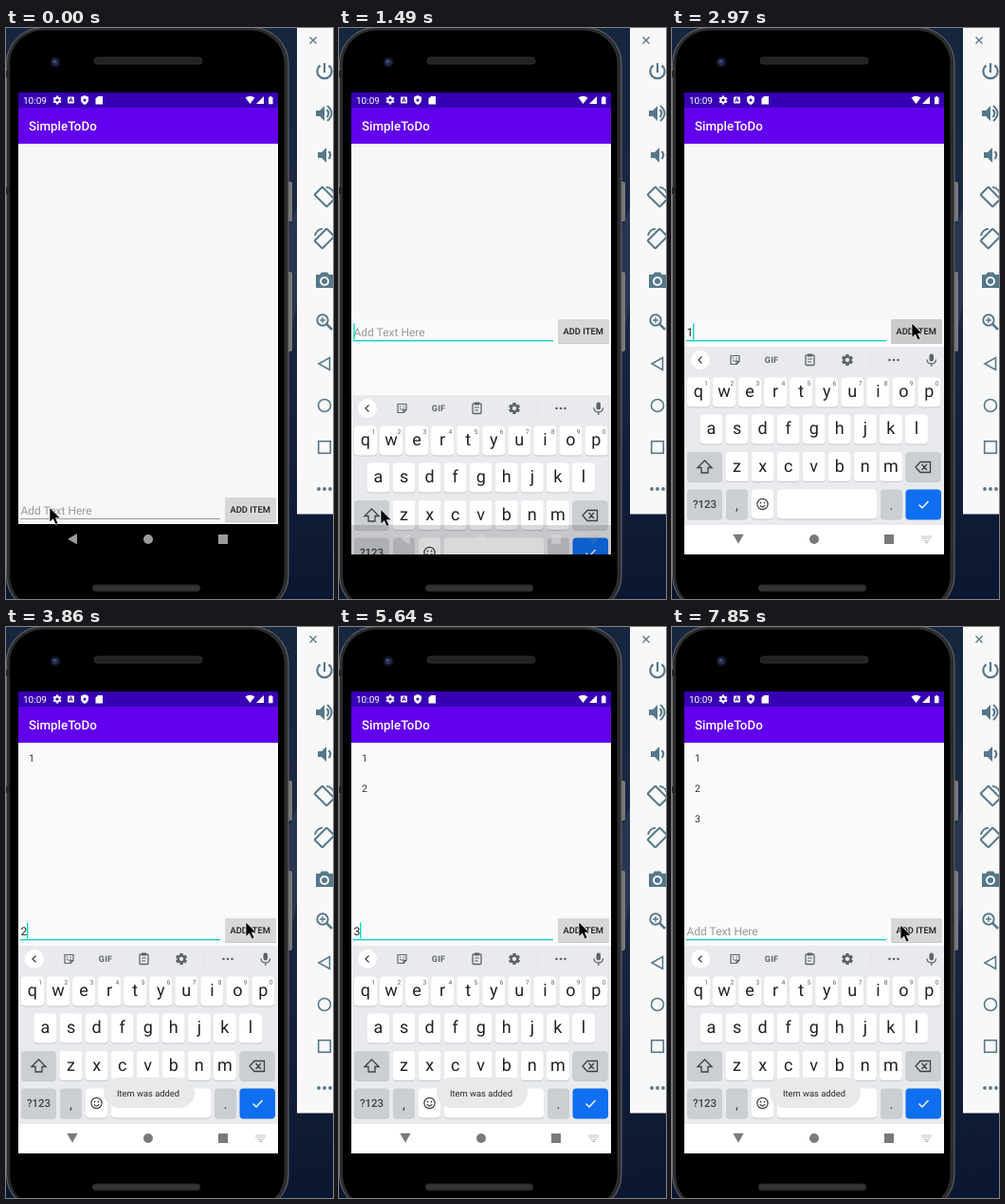
An HTML page that plays this animation: 345x602 px, repeating every 8000 ms.

```html
<!DOCTYPE html>
<html lang="en">
<head>
<meta charset="utf-8">
<title>To-do list demo</title>
<style>
html, body { margin: 0; width: 100%; height: 100%; overflow: hidden; background: #0d1930; }
svg { display: block; width: 100%; height: 100%; font-family: Roboto, sans-serif; text-rendering: geometricPrecision; }
.mid { text-anchor: middle; }
</style>
</head>
<body>
<svg id="stage" viewBox="0 0 345 602"></svg>
<script>
const LOOP = 8000, STEP = LOOP / 54;
const SLATE = '#56788a', DARK = '#3c4043', GREY = '#5f6368';

const rect = (x, y, w, h, fill, rx = 0, more = '') =>
  `<rect x="${x}" y="${y}" width="${w}" height="${h}" rx="${rx}" fill="${fill}" ${more}/>`;
const circle = (x, y, r, fill, more = '') =>
  `<circle cx="${x}" cy="${y}" r="${r}" fill="${fill}" ${more}/>`;
const path = (d, fill, more = '') => `<path d="${d}" fill="${fill}" ${more}/>`;
const line = (d, color, w = 1.5, more = '') =>
  path(d, 'none', `stroke="${color}" stroke-width="${w}" ${more}`);
const text = (x, y, size, fill, str, more = '') =>
  `<text x="${x}" y="${y}" font-size="${size}" fill="${fill}" ${more}>${str}</text>`;
const at = (x, y, body) => `<g transform="translate(${x} ${y})">${body}</g>`;
const MID = 'class="mid"', BOLD = 'font-weight="500"';

function gear(r, color, hole) {
  let teeth = '';
  for (let a = 0; a < 360; a += 60)
    teeth += rect(-r * .28, -r, r * .56, r, color, 0, `transform="rotate(${a})"`);
  return teeth + circle(0, 0, r * .74, color) + circle(0, 0, r * .36, hole);
}

function phone() {
  return rect(0, 0, 345, 602, 'url(#sky)') +
    path('M299 210L307 190V290L299 330Z', '#293650') +
    rect(296, 162, 6, 42, '#77787a', 2) + rect(296, 257, 6, 84, '#77787a', 2) +
    rect(.5, -.5, 297.5, 616, '#2b2c2e', 38, 'stroke="#6a6b6d"') +
    rect(4, 2.5, 289.5, 610, '#000', 35) +
    rect(0, 45, 4, 7, '#252628') + rect(0, 168, 4, 7, '#252628') +
    circle(52, 36, 5.5, '#10131b') + circle(52, 36, 3.6, '#232d52') + circle(51.3, 35.3, 1.3, '#4a5a94') +
    rect(93, 31, 114, 7, '#222', 3.5, 'stroke="#303030"') +
    rect(91, 587, 114, 7, '#333', 3.5, 'stroke="#1d1d1d"');
}

function appBar() {
  const bar = '#3700b3', w = '#fff';
  return rect(13, 68, 274, 16, bar) + rect(13, 84, 274, 38, '#6200ee') +
    text(18, 79.8, 10, w, '10:09') +
    at(54, 76, gear(4.5, w, bar)) +
    rect(65, 72.5, 7, 7, w, 1) + text(68.5, 78.4, 6.5, bar, 'A', MID + ' font-weight="700"') +
    path('M83 71L87 72.7V75.5Q87 79 83 81Q79 79 79 75.5V72.7Z', w) + circle(83, 76, 1.5, bar) +
    path('M97 72H102V80.5H94.5V74.5Z', w) +
    path('M252.5 73.6Q257.5 69.8 262.5 73.6L257.5 80Z', w) +
    path('M264 80L272 72V80Z', w) +
    path('M277 73H278.2V72H280.2V73H281.5V80.3H277Z', w) +
    text(24, 108, 13.33, w, 'SimpleToDo', BOLD);
}

function sidePanel() {
  const spk = 'M-9-3H-5L0-8V8L-5 3H-9Z';
  const turn = rect(-5.8, -9, 11.6, 18, 'none', 1, `transform="rotate(-45)" stroke="${SLATE}" stroke-width="2"`) +
    line('M2-10.3Q8.5-9.5 10-3', SLATE, 1.8);
  const tools = [
    line('M0-9V1M-4.5-6.5A7.6 7.6 0 1 0 4.5-6.5', SLATE, 2.2),
    path(spk, SLATE) + line('M2.5-4Q6 0 2.5 4M3-8Q12 0 3 8', SLATE, 2),
    path(spk, SLATE, 'transform="translate(2 0)"') + line('M4.5-4Q8 0 4.5 4', SLATE, 2),
    turn,
    `<g transform="scale(-1 1)">${turn}</g>`,
    path('M-9-6H-5L-3-8.5H3L5-6H9V8H-9Z', SLATE) + circle(0, 1, 5, '#f8f8f8') + circle(0, 1, 3, SLATE),
    circle(-2, -2, 5.7, 'none', `stroke="${SLATE}" stroke-width="1.9"`) +
      line('M2.5 2.5L8 8', SLATE, 2.5) + line('M-5-2H1M-2-5V1', SLATE, 1.4),
    line('M5.5-6.5V6.5L-6 0Z', SLATE, 1.6),
    circle(0, 0, 6.5, 'none', `stroke="${SLATE}" stroke-width="1.6"`),
    rect(-6.3, -6.3, 12.6, 12.6, 'none', 0, `stroke="${SLATE}" stroke-width="1.6"`),
    [-6, 0, 6].map(x => circle(x, 0, 1.9, SLATE)).join('')
  ];
  return rect(307, 0, 38, 512.5, '#f8f8f8') +
    line('M320.5 9.5L327.5 16.5M327.5 9.5L320.5 16.5', SLATE, 1.4) +
    tools.map((body, i) => at(336, 46 + 44 * i, body)).join('');
}

const key = (x, y, w, fill) =>
  rect(x, y + 1, w, 31, '#c3c6ca', 4) + rect(x, y, w, 31, fill, 4);

// One row of letter keys, centred on the keyboard.
function letters(str, y, digits) {
  const pitch = 27.05, left = 149.7 - pitch * (str.length - 1) / 2;
  return [...str].map((c, i) => {
    const cx = left + pitch * i;
    return key(cx - 12, y, 24, '#fff') + text(cx, y + 20.8, 18, '#202124', c, MID) +
      (digits ? text(cx + 8.3, y + 8.5, 6.8, GREY, (i + 1) % 10, MID) : '');
  }).join('');
}

function keyboard() {
  const mod = '#cbced3';
  return rect(13, 336, 274, 219, '#e8eaed') +
    circle(30, 350, 10, '#fff') + line('M31.5 346.5L28 350L31.5 353.5', DARK, 1.3) +
    line('M62 345.5H71V351.5L68 354.5H62ZM71 351.5H68V354.5', GREY, 1.2, 'stroke-linejoin="round"') +
    line('M64 350Q66.3 353 68.7 350', GREY, 1) + circle(64.6, 348, .7, GREY) + circle(68.2, 348, .7, GREY) +
    text(105, 353.3, 9, GREY, 'GIF', MID + ' font-weight="700" letter-spacing=".3"') +
    rect(141, 345, 9, 10.5, 'none', 1, `stroke="${GREY}" stroke-width="1.3"`) +
    rect(143, 343.5, 5, 3, GREY) + line('M143 349H148M143 352H147', GREY, 1) +
    at(185, 350, gear(6, GREY, '#e8eaed')) +
    rect(209, 343, .7, 14, '#dadce0') +
    [229.5, 234, 238.5].map(x => circle(x, 350, 1.3, GREY)).join('') +
    rect(271.5, 343.5, 4.5, 8, GREY, 2.2) + line('M269 349.5Q269.3 354 273.8 354Q278.2 354 278.5 349.5M273.8 354V357', GREY, 1.3) +
    letters('qwertyuiop', 368.5, true) +
    letters('asdfghjkl', 407.5) +
    letters('zxcvbnm', 447) +
    key(16, 447, 37, mod) + line('M34.5 456L42 463.5H38V469H31V463.5H27Z', DARK, 1.3) +
    key(246.5, 447, 37, mod) + line('M262 457.5H272.5V468.5H262L257 463ZM263.5 460L269 466M269 460L263.5 466', DARK, 1.3) +
    key(16, 486.5, 37, mod) + text(34.5, 506.2, 11.5, DARK, '?123', MID + ' ' + BOLD) +
    key(57, 486.5, 23, mod) + text(68.5, 508, 15, DARK, ',', MID) +
    key(84, 486.5, 23, '#fff') + circle(95.5, 502, 5.6, 'none', `stroke="${DARK}" stroke-width="1.2"`) +
    circle(93.5, 500.5, .9, DARK) + circle(97.5, 500.5, .9, DARK) + line('M92.7 503.2Q95.5 507 98.3 503.2', DARK, 1.1) +
    key(111, 486.5, 105, '#fff') +
    key(220, 486.5, 23, mod) + text(231.5, 508, 15, DARK, '.', MID) +
    rect(246.5, 486.5, 37.5, 32, '#0f6ff0', 4) + line('M260.5 502.5L264 506L270.5 499', '#fff', 1.4);
}

function nav() {
  return at(70, 538.7, path('M-5 0L5-5.7V5.7Z', 'inherit', 'id="back"')) +
    circle(150, 539, 5, 'inherit') + rect(224, 534, 10, 10, 'inherit') +
    `<g id="ime">` + line('M263.5 536H274M263.5 538H274M265.5 540.2H272', '#9a9a9a', 1.1, 'stroke-dasharray="1.2 .8"') +
    path('M267 541.8H270.5L268.7 543.5Z', '#9a9a9a') + '</g>';
}

const stage = document.getElementById('stage');
stage.innerHTML = `<defs>
  <linearGradient id="sky" x2="0" y2="1"><stop stop-color="#16263f"/><stop offset=".45" stop-color="#1c2942"/><stop offset="1" stop-color="#0b1730"/></linearGradient>
  <clipPath id="screen"><rect x="13" y="68" width="274" height="487"/></clipPath></defs>` +
  phone() + `<g clip-path="url(#screen)">` +
  rect(13, 121, 274, 402, '#f7f7f7', 0, 'id="page"') +
  rect(13, 306, 274, 249, '#fafafa', 0, 'id="strip"') + appBar() +
  [1, 2, 3].map(i => text(24, 109.7 + 32 * i, 10.67, '#333', i, `id="item${i}"`)).join('') +
  `<g id="form">` +
  text(15.5, 324.5, 12, '#999', '', 'id="field"') +
  rect(15, 329, 211, 1, '#999', 0, 'id="under"') +
  rect(15.5, 311.5, 1.4, 17, '#03dac5', 0, 'id="caret"') +
  rect(231, 308, 54, 25, '#c4c4c4', 1.5) + rect(231, 307, 54, 25, '#d6d7d7', 1.5, 'id="button"') +
  text(257.7, 322.8, 9.33, '#1c1c1c', 'ADD ITEM', MID + ' ' + BOLD) + `</g>` +
  `<g id="keys">${keyboard()}</g>` +
  rect(13, 524, 274, 31, '#fff', 0, 'id="navBg"') + `<g id="nav">${nav()}</g>` +
  `<g id="toast">${rect(103, 475, 96, 32, '#e9e9e9', 16)}${text(150, 494.8, 9.33, '#2b2b2b', 'Item was added', MID)}</g>` +
  `</g>` + sidePanel() +
  `<g id="mouse">${path('M0 0V15.5L3.7 12.2L6.3 18L9 16.8L6.5 11.2H11.3Z', '#000', 'stroke="#fff" stroke-width=".7"')}</g>`;

const $ = id => document.getElementById(id);
const set = (id, attrs) => { for (const k in attrs) $(id).setAttribute(k, attrs[k]); };
const show = (id, on) => set(id, { opacity: +on });
const within = (n, spans) => spans.some(([a, b]) => n >= a && n < b);

// Piecewise track of [step, value] points, eased between neighbours.
function track(n, pts) {
  let i = pts.length - 1;
  while (i > 0 && n < pts[i][0]) i--;
  const [a, v] = pts[i], next = pts[i + 1];
  if (!next || n < a) return v;
  const p = (n - a) / (next[0] - a);
  return v + (next[1] - v) * p * p * (3 - 2 * p);
}

const ADDED = [21, 34, 44], TYPED = [13, 25, 37];
const CARET = [[7, 11], [13, 17], [19, 30], [32, 40], [42, 47], [50, 53]];
const PRESS = [[19, 22], [32, 35], [42, 45]];

function draw(ms) {
  const n = Math.floor((ms + 10) / STEP) % 54;
  const open = n >= 10, ready = n >= 11, rising = open && !ready;
  const count = ADDED.filter(a => n >= a).length;
  const value = n >= TYPED[count] ? String(count + 1) : '';

  set('page', { fill: count ? '#fafafa' : '#f7f7f7' });
  show('strip', open);
  for (let i = 1; i <= 3; i++) show('item' + i, count >= i);

  set('form', { transform: `translate(0 ${open ? 0 : 188})` });
  $('field').textContent = value || 'Add Text Here';
  set('field', { fill: value ? '#222' : '#999' });
  set('under', n >= 7 ? { fill: '#13cfc0', height: 1.4 } : { fill: '#999', height: 1 });
  set('caret', { x: value ? 22 : 15.3 });
  show('caret', within(n, CARET));
  set('button', { fill: within(n, PRESS) ? '#cbcbcb' : '#d6d7d7' });

  show('keys', open);
  set('keys', { transform: `translate(0 ${track(n, [[9, 219], [10, 51], [11, 0]])})` });
  set('navBg', { fill: ready ? '#fff' : '#000', opacity: rising ? .15 : 1 });
  set('nav', { fill: ready ? '#7a7a7a' : open ? '#ddd' : '#9c9c9c', opacity: rising ? .5 : 1 });
  set('back', { transform: `rotate(${track(n, [[10, 0], [11, -30], [12, -75], [13, -90]])})` });
  show('ime', n >= 8);

  set('toast', { opacity: track(n, [[21, 0], [23, 1], [34, 1], [36, 0], [37, .6], [38, 1], [48, 1], [50, 0], [51, 0], [53, 1]]) });

  const x = track(n, [[5, 46], [8, 44], [12, 44], [17, 253], [45, 253], [49, 241]]);
  const y = track(n, [[5, 505.5], [8, 507.5], [12, 507.5], [17, 311], [45, 311], [49, 314]]);
  set('mouse', { transform: `translate(${x} ${y})` });
}

const start = performance.now();
function tick() {
  draw((performance.now() - start) % LOOP);
  requestAnimationFrame(tick);
}
tick();
</script>
</body>
</html>
```
